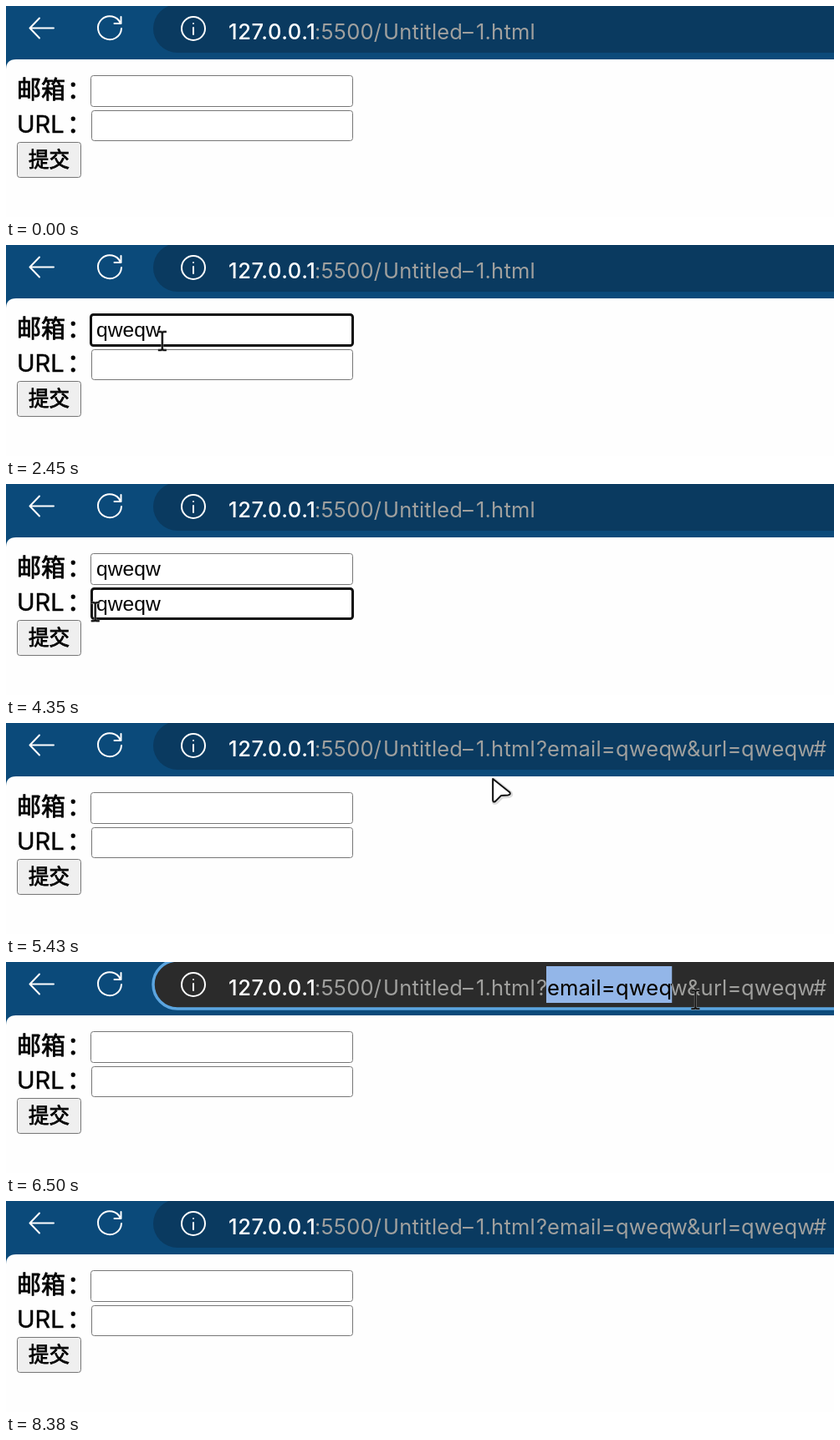
Recreate the animation shown at these times as an HTML page. Size 990 by 253 pixels, loop 8.53 s.

```html
<!DOCTYPE html>
<html lang="zh-CN">
<head>
<meta charset="utf-8">
<title>Form submit</title>
<style>
html, body { margin: 0; width: 100%; height: 100%; overflow: hidden; background: #fff; }
svg { display: block; }
.url { font: 25.5px Inter, "Noto Sans", sans-serif; letter-spacing: .2px; }
.host { font-weight: 500; letter-spacing: .55px; }
.label { font: 29px Inter, "Noto Sans CJK SC", "Noto Sans CJK", sans-serif; stroke: #000; stroke-width: .4; }
.cjk { font-family: "Noto Sans CJK SC", "Noto Sans CJK", sans-serif; stroke-width: .8; }
.value { font: 24.7px "Liberation Sans", Arial, sans-serif; }
.icon { fill: none; stroke: #fff; stroke-width: 2; stroke-linecap: round; stroke-linejoin: round; }
</style>
</head>
<body>
<svg width="990" height="253" viewBox="0 0 990 253">
  <defs>
    <clipPath id="clip"><rect id="clipBox" y="5" height="44"/></clipPath>
    <path id="beamLine" d="M-5 -11H-2Q0 -11 0 -9V9Q0 11 -2 11H-5M5 -11H2Q0 -11 0 -9M0 9Q0 11 2 11H5"/>
  </defs>

  <rect width="990" height="253" fill="#0b4a7a"/>
  <path d="M0 253V76Q0 64 12 64H990V253Z" fill="#fefefe"/>

  <rect id="bar" x="176" y="-2" width="900" height="58" rx="29" fill="#0a3a60"/>
  <g class="icon">
    <path d="M57 26.500H29M40 14.500L28.500 26.500L40 38.500"/>
    <path d="M137 21A14 14 0 1 0 138 27M137.500 13V21H129.500"/>
    <circle cx="224" cy="27" r="14"/>
    <path d="M224 26V34M224 21V21.100"/>
  </g>
  <g class="url" fill="#a0a09e">
    <text class="host" x="266" y="40" fill="#fff">127.0.0.1</text>
    <text y="40"><tspan x="369">:5500/</tspan><tspan x="451">Untitled</tspan><tspan x="546">–</tspan><tspan x="562">1.html</tspan></text>
    <g id="query">
      <text x="634" y="40">?</text>
      <rect id="sel" y="5" height="44" fill="#93b6e8"/>
      <text id="params" y="40"><tspan x="647">email=qweq</tspan><tspan x="794">w</tspan><tspan x="814">&amp;url=</tspan><tspan x="879">qweqw</tspan></text>
      <text x="965" y="40">#</text>
      <g clip-path="url(#clip)"><use href="#params" fill="#000"/></g>
    </g>
  </g>

  <g class="label">
    <text class="cjk" x="13" y="111">邮箱<tspan x="73">：</tspan></text>
    <text x="13" y="152">URL<tspan class="cjk" x="73">：</tspan></text>
  </g>
  <rect id="box0" x="101.500" y="83.500" width="313" height="37" rx="3" fill="#fff"/>
  <rect id="box1" x="102.500" y="125.500" width="312" height="36" rx="3" fill="#fff"/>
  <text id="value0" class="value" x="108" y="110"></text>
  <text id="value1" class="value" x="108" y="152"></text>
  <rect id="caret" width="1.500" height="27"/>
  <rect id="button" x="13.500" y="163.500" width="76" height="42" rx="3" stroke="#767676"/>
  <text class="label cjk" x="27" y="193" style="font-size:24.500px">提交</text>

  <g id="arrow" stroke-linejoin="round">
    <path d="M1 2L21 18Q23 21 19 21.500L11 22L4 29Q1 31 1 27Z" fill="none" stroke="#0002" stroke-width="5"/>
    <path d="M0 1L20 17Q22 20 18 20.500L10 21L3 28Q0 30 0 26Z" fill="#fff" stroke="#111" stroke-width="2"/>
  </g>
  <g id="beam" fill="none">
    <use href="#beamLine" stroke="#888" stroke-width="3"/>
    <use href="#beamLine" stroke="#111" stroke-width="1.800"/>
  </g>
</svg>
<script>
const LOOP = 8530, WORD = 'qweqw', SUBMIT = 5020;
const $ = id => document.getElementById(id);
const set = (id, attrs) => { for (const k in attrs) $(id).setAttribute(k, attrs[k]); };
const show = (id, on) => set(id, { visibility: on ? 'visible' : 'hidden' });

// pointer path: time, x, y
const path = [
  [300, 285, 252], [850, 187, 115], [2450, 187, 115], [2780, 140, 132],
  [4210, 140, 132], [4350, 107, 153], [4580, 50, 183], [5020, 50, 183],
  [5120, 64, 191], [5430, 582, 66], [5850, 636, 27], [5950, 643, 30],
  [6370, 643, 30], [6500, 824, 45], [6930, 973, 63], [7070, 971, 60],
  [7350, 971, 60], [7580, 780, 256]
];
const fields = [
  { y: 83, bottom: 121, focus: 1140, blur: 2970, keys: [1500, 1500, 1650, 1870, 1930] },
  { y: 125, bottom: 162, focus: 2970, blur: 4760, keys: [3180, 3250, 3320, 3460, 3500] }
];
const params = $('params');

function pointerAt(t) {
  const i = path.findIndex(p => p[0] > t);
  if (i < 1) return path[i ? path.length - 1 : 0].slice(1);
  const [a, b] = [path[i - 1], path[i]], k = (t - a[0]) / (b[0] - a[0]);
  return [a[1] + (b[1] - a[1]) * k, a[2] + (b[2] - a[2]) * k];
}

function drawField(f, i, t, x, y) {
  const typed = f.keys.filter(k => t >= k).length;
  const focused = t >= f.focus && t < f.blur;
  const hover = x > 101 && x < 415 && y > f.y && y < f.bottom;
  $('value' + i).textContent = t < SUBMIT ? WORD.slice(0, typed) : '';
  set('box' + i, {
    stroke: focused ? '#101010' : hover ? '#4f4f4f' : '#767676',
    'stroke-width': focused ? 3 : 1
  });
  if (focused) {
    const idle = t - (typed ? f.keys[typed - 1] : f.focus);
    set('caret', { x: 108 + $('value' + i).getComputedTextLength(), y: f.y + 5 });
    show('caret', idle % 1040 < 520);
  }
  return hover;
}

function drawSelection(t) {
  let end = 646;
  if (t >= 6370 && t < 8380) {
    const x = pointerAt(Math.min(t - 20, 6930))[0];
    for (let i = 0; i < params.getNumberOfChars(); i++) {
      const a = params.getStartPositionOfChar(i).x, b = params.getEndPositionOfChar(i).x;
      if ((a + b) / 2 < x) end = b;
    }
  }
  for (const id of ['sel', 'clipBox']) set(id, { x: 646, width: end - 646 });
}

function draw(now) {
  const t = now % LOOP, [x, y] = pointerAt(t);
  show('caret', false);
  const overField = fields.map((f, i) => drawField(f, i, t, x, y)).includes(true);

  const overButton = x > 13 && x < 90 && y > 163 && y < 206;
  const pressed = t >= 4760 && t < SUBMIT;
  set('button', { fill: pressed ? '#f5f5f5' : overButton ? '#e5e5e5' : '#efefef' });

  const active = t >= 6230 && t < 8380;
  set('bar', { fill: active ? '#2b2b2b' : '#0a3a60', stroke: active ? '#5ba5e0' : 'none', 'stroke-width': 3.5 });
  show('query', t >= SUBMIT);
  drawSelection(t);

  const visible = t >= 300 && t < 7580;
  const text = overField || x > 176 && y < 58 || t >= 6370 && t < 7070;
  const move = { transform: `translate(${x} ${y})` };
  set('arrow', move);
  set('beam', move);
  show('arrow', visible && !text);
  show('beam', visible && text);
}

const start = performance.now();
function tick() {
  draw(performance.now() - start);
  requestAnimationFrame(tick);
}
tick();
</script>
</body>
</html>
```
